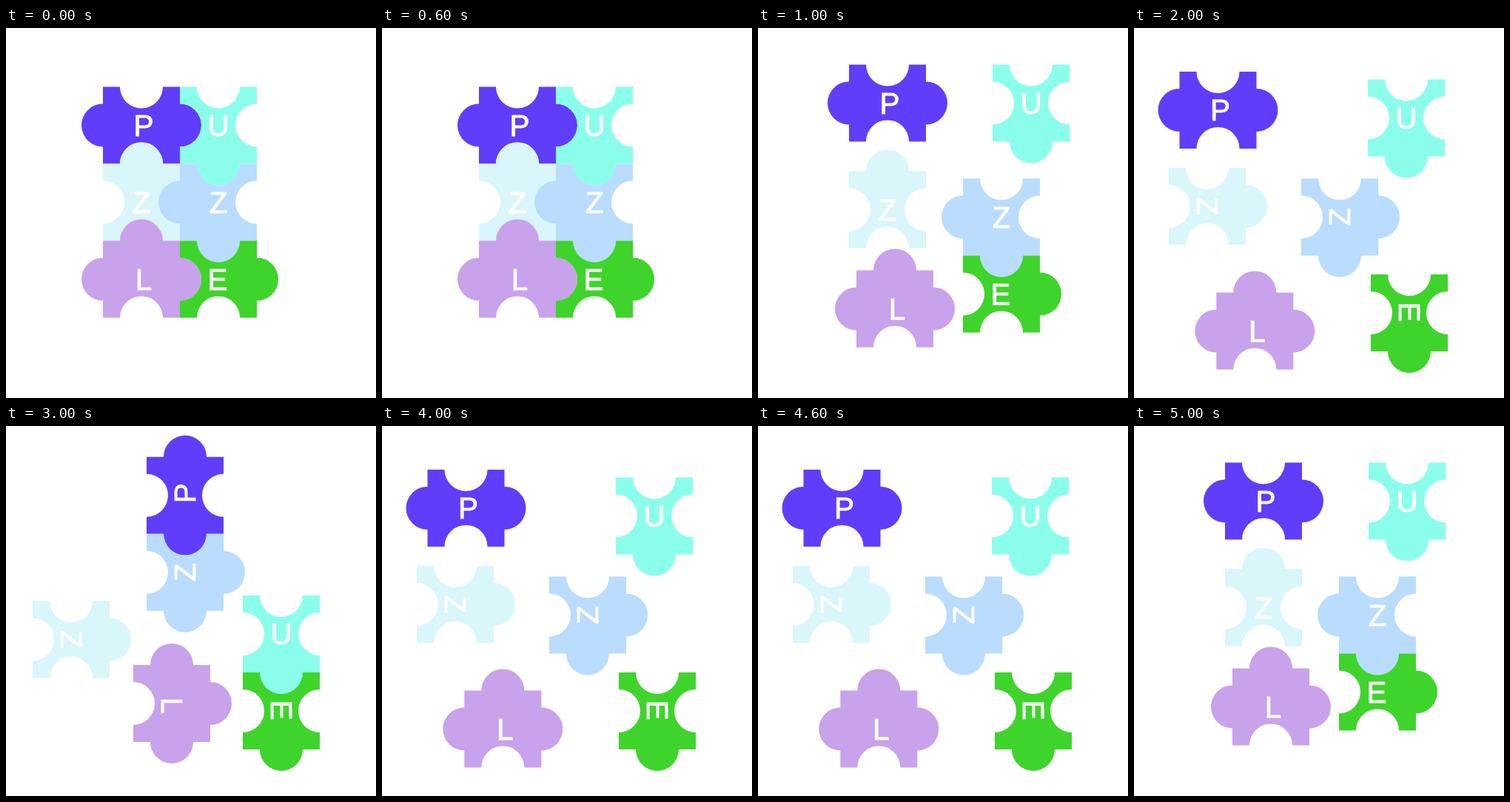
An HTML page that plays this animation: 500 by 500 pixels, repeating every 6000 ms.

```html
<!DOCTYPE html>
<html lang="en">
<head>
<meta charset="utf-8">
<title>Puzzle</title>
<style>
  html, body { margin: 0; width: 100%; height: 100%; overflow: hidden; background: #fff; }
  svg { display: block; width: 100%; height: 100%; }
  text {
    fill: #fff; stroke: #fff; stroke-width: .9px;
    font: 40.5px "Liberation Sans", Arial, sans-serif; text-anchor: middle;
  }
</style>
</head>
<body>
<svg viewBox="0 0 500 500"><g id="board" transform="translate(0 .4)"></g></svg>
<script>
const size = 104, radius = 29, stepMs = 1000;

// A piece may make one quarter turn (1 = clockwise) on reaching stage turnAt.
const pieces = [
  { letter: 'P', color: '#603dfb', tabs: 'right left', turn: -1, turnAt: 3, nudge: 3 },
  { letter: 'U', color: '#8bfeeb', tabs: 'bottom' },
  { letter: 'Z', color: '#d9f6fb', tabs: 'top', turn: 1, turnAt: 2 },
  { letter: 'Z', color: '#b9dcff', tabs: 'bottom left', turn: -1, turnAt: 2 },
  { letter: 'L', color: '#c8a2eb', tabs: 'top right left', turn: 1, turnAt: 3, nudge: 3 },
  { letter: 'E', color: '#3ed42b', tabs: 'right', turn: 1, turnAt: 2, nudge: -1 },
];

const at = (x, y) => ({ x, y });
const below = p => at(p.x, p.y + size);
const above = p => at(p.x, p.y - size);

// Each stage gives the piece centres in reading order.
function assembled() {
  return pieces.map((_, i) => at(183 + i % 2 * size, 131 + Math.floor(i / 2) * size));
}

function loosened() {
  const blueZ = at(329, 255);
  return [at(175, 101), at(369, 101), at(175, 245), blueZ, at(185, 379), below(blueZ)];
}

const cornerE = at(372, 384.5);

function scattered() {
  return [at(113.5, 110.5), at(368, 121), at(99, 240.5), at(278, 255), at(163.3, 409), cornerE];
}

function stacked() {
  const p = at(242, 93.3);
  return [p, above(cornerE), at(88, 288), below(p), at(224, 374.5), cornerE];
}

const stages = [assembled(), loosened(), scattered(), stacked()];

function outline(tabs) {
  const flat = size / 2 - radius;
  const sides = ['top', 'right', 'bottom', 'left'].map((side, i) => {
    const dx = [1, 0, -1, 0][i], dy = [0, 1, 0, -1][i];
    const edge = `l${dx * flat} ${dy * flat}`;
    const sweep = tabs.includes(side) ? 1 : 0;
    return `${edge}a${radius} ${radius} 0 0 ${sweep} ${dx * 2 * radius} ${dy * 2 * radius}${edge}`;
  });
  return `M${-size / 2} ${-size / 2}${sides.join('')}z`;
}

const board = document.getElementById('board');
board.innerHTML = pieces.map(({ letter, color, tabs, nudge = 0 }) =>
  `<g><path d="${outline(tabs)}" fill="${color}"/><text x="${nudge}" y="14.3">${letter}</text></g>`
).join('');

function draw(time) {
  // Run through the stages and back again.
  const last = stages.length - 1;
  const stage = last - Math.abs(last - Math.floor(time / stepMs) % (2 * last));
  pieces.forEach(({ turn, turnAt }, i) => {
    const { x, y } = stages[stage][i];
    const angle = stage >= turnAt ? turn * 90 : 0;
    board.children[i].setAttribute('transform', `translate(${x} ${y}) rotate(${angle})`);
  });
}

const start = performance.now();
function tick() {
  draw(performance.now() - start);
  requestAnimationFrame(tick);
}
tick();
</script>
</body>
</html>
```
